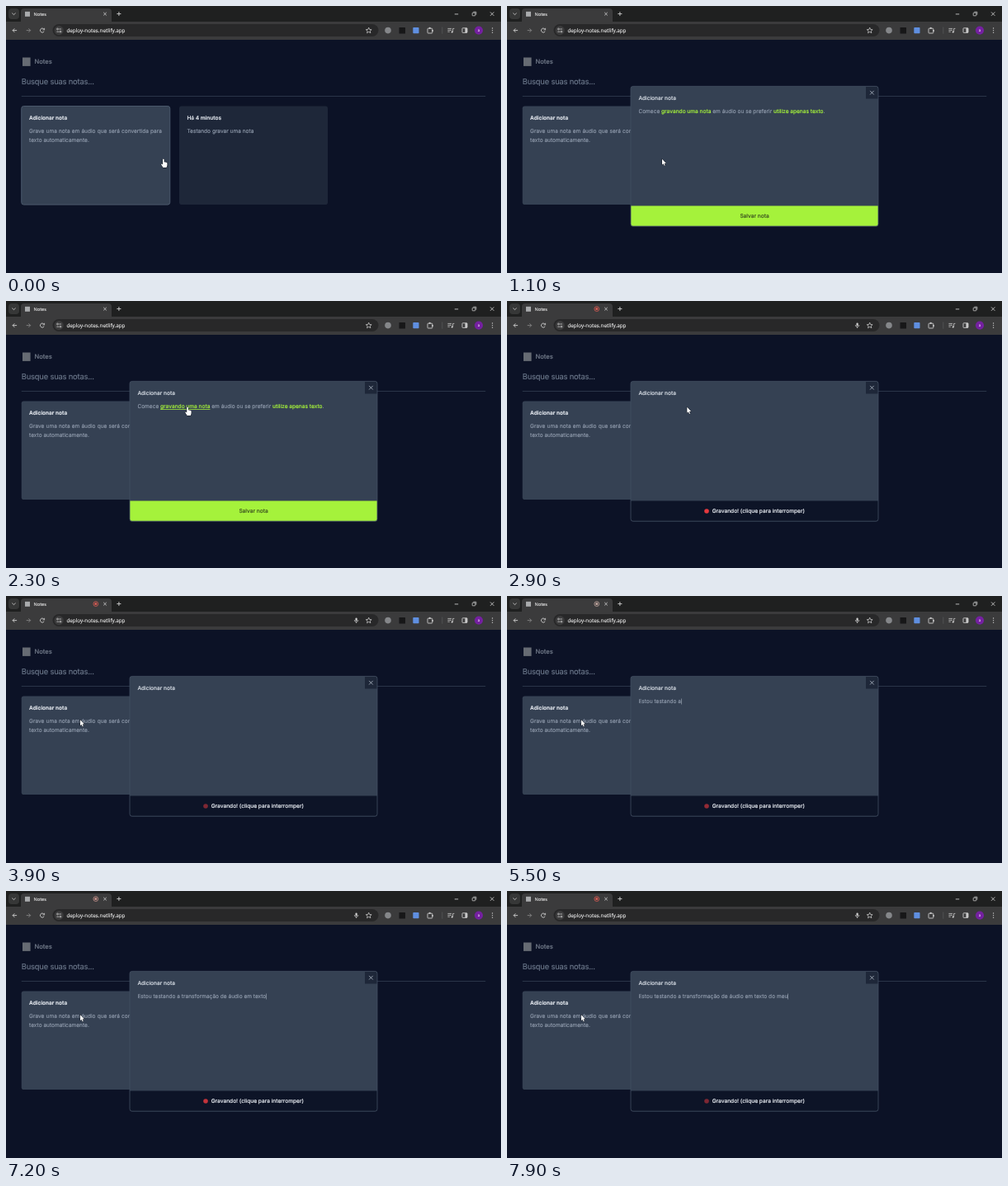
An HTML page with a canvas that plays this animation: 600x324 px, repeating every 8000 ms.

```html
<!DOCTYPE html>
<html lang="pt-BR">
<head>
<meta charset="utf-8">
<title>Notes</title>
<style>
html, body { margin: 0; width: 100%; height: 100%; overflow: hidden; background: #0c1226; }
canvas { display: block; width: 600px; height: 324px; }
</style>
</head>
<body>
<canvas id="stage"></canvas>
<script>
const W = 600, H = 324, LOOP = 8000;
const canvas = document.getElementById('stage');
const ctx = canvas.getContext('2d');
const dpr = window.devicePixelRatio || 1;
canvas.width = W * dpr;
canvas.height = H * dpr;

const UI = 'Inter, sans-serif';
const SYSTEM = '"Open Sans", sans-serif';
const SMALL = 6.5625;
const PAGE = '#0c1226', SLATE = '#354153', LIME = '#a5f23b';
const MUTED = '#919cad', LIGHT = '#eaeef4', ICON = '#c9c9c9';

const OPEN = 400, RECORD = 2800;
const LINK = { x: 187, y: 123, w: 61, h: 10 };

// Time, x and y of the pointer tip.
const PATH = [
  [0, 190.8, 185.5], [400, 190.8, 185.5], [900, 188, 185.7], [1500, 188, 185.7],
  [2100, 206, 155], [2300, 220, 128.5], [2850, 220, 128.5], [3600, 90, 150.3]
];
const WORDS = [
  [4700, 'Estou'], [5100, 'testando'], [5400, 'a'], [5800, 'transformação'], [6200, 'de'],
  [6500, 'áudio'], [6800, 'em'], [7000, 'texto'], [7500, 'do'], [7700, 'meu']
];

const smooth = p => p * p * (3 - 2 * p);

function box(x, y, w, h, r, fill, stroke, lw = 0.8) {
  ctx.beginPath();
  ctx.roundRect(x, y, w, h, r);
  if (fill) { ctx.fillStyle = fill; ctx.fill(); }
  if (stroke) { ctx.strokeStyle = stroke; ctx.lineWidth = lw; ctx.stroke(); }
}

function disc(x, y, r, fill, stroke, lw = 0.8) {
  box(x - r, y - r, 2 * r, 2 * r, r, fill, stroke, lw);
}

function line(points, color, lw = 0.9) {
  ctx.beginPath();
  for (let i = 0; i < points.length; i += 2) ctx.lineTo(points[i], points[i + 1]);
  ctx.strokeStyle = color;
  ctx.lineWidth = lw;
  ctx.stroke();
}

function cross(x, y, r, color, lw) {
  line([x - r, y - r, x + r, y + r], color, lw);
  line([x - r, y + r, x + r, y - r], color, lw);
}

// Draws one run of text, slightly thickened, and returns its right edge.
function text(s, x, y, color, { size = SMALL, weight = 400, font = UI, track = 0, gap = 0, align = 'left' } = {}) {
  ctx.font = `${weight} ${size}px ${font}`;
  ctx.letterSpacing = track + 'px';
  ctx.wordSpacing = gap + 'px';
  ctx.textAlign = align;
  ctx.fillStyle = ctx.strokeStyle = color;
  ctx.lineWidth = 0.14;
  ctx.lineJoin = 'round';
  ctx.fillText(s, x, y);
  ctx.strokeText(s, x, y);
  return x + ctx.measureText(s).width;
}

function drawTabs(t) {
  box(0, 0, W, 20, 0, '#1f2020');
  box(3, 3, 13, 13, 4, '#363737');
  line([7.4, 8.6, 9.5, 10.6, 11.6, 8.6], ICON);
  box(18, 3, 110, 20, 4, '#3b3b3c');
  box(23, 6.8, 6, 6, 0, '#a9abad');
  text('Notes', 33.6, 11.8, '#e4e4e4', { size: 5.55, font: SYSTEM });
  if (t >= RECORD) drawTabRecord(t);
  cross(120, 9.6, 1.8, '#d5d5d5', 0.8);
  line([134.4, 9.5, 139.4, 9.5], '#d0d0d0');
  line([136.9, 7, 136.9, 12], '#d0d0d0');
  line([543.8, 9.9, 548.2, 9.9], '#dddddd', 0.8);
  box(565.2, 8.2, 3.6, 3.6, 0.5, null, '#dddddd', 0.7);
  line([566.4, 7.2, 569.8, 7.2, 569.8, 10.6], '#dddddd', 0.7);
  cross(589.2, 9.6, 2.2, '#dddddd', 0.8);
}

function drawTabRecord(t) {
  const glow = 0.5 + 0.5 * Math.cos((t - 3900) / 1000 * 2 * Math.PI);
  const mix = (a, b) => Math.round(a + (b - a) * glow);
  const color = `rgb(${mix(196, 220)},${mix(178, 92)},${mix(172, 84)})`;
  disc(108.8, 9.6, 2.9, null, color, 0.8);
  disc(108.8, 9.6, 1.5, color);
}

function drawArrow(x, dir, color) {
  line([x - 2.5, 29.6, x + 2.5, 29.6], color);
  line([x + dir * 0.2, 27.3, x + dir * 2.5, 29.6, x + dir * 0.2, 31.9], color);
}

function drawStar(x, y, r) {
  const points = [];
  for (let i = 0; i <= 10; i++) {
    const a = i * Math.PI / 5 - Math.PI / 2, d = i % 2 ? r * 0.45 : r;
    points.push(x + d * Math.cos(a), y + d * Math.sin(a));
  }
  line(points, '#d2d2d2', 0.75);
}

function drawMic(x, y) {
  box(x - 1.1, y - 3.4, 2.2, 4, 1.1, '#d0d0d0');
  ctx.beginPath();
  ctx.arc(x, y - 0.7, 2.3, 0, Math.PI);
  ctx.strokeStyle = '#d0d0d0';
  ctx.lineWidth = 0.7;
  ctx.stroke();
  line([x, y + 1.6, x, y + 3.2], '#d0d0d0', 0.8);
}

function drawToolbar(t) {
  box(0, 19, W, 22, 0, '#3b3b3c');
  box(56.5, 22, 395, 15, 7.5, '#282829');
  drawArrow(10.6, -1, '#d2d2d2');
  drawArrow(27.2, 1, '#858585');
  ctx.beginPath();
  ctx.arc(44, 29.6, 2.5, 0.5, 5.6);
  ctx.strokeStyle = '#d2d2d2';
  ctx.lineWidth = 0.9;
  ctx.stroke();
  line([46.6, 26.8, 46.6, 28.9, 44.5, 28.9], '#d2d2d2', 0.8);

  disc(64.2, 29.6, 5.6, '#3c3c3d');
  disc(62.5, 28, 0.9, null, '#d8d8d8', 0.7);
  line([64.2, 28, 67, 28], '#d8d8d8', 0.7);
  disc(66, 31.2, 0.9, null, '#d8d8d8', 0.7);
  line([61.4, 31.2, 64.3, 31.2], '#d8d8d8', 0.7);
  text('deploy-notes.netlify.app', 73.4, 31.8, '#e8e8e8', { size: 6.35, font: SYSTEM });
  if (t >= RECORD) drawMic(424.6, 29.8);
  drawStar(439.7, 29.8, 3.6);

  disc(463, 29.6, 3.8, '#85878a');
  box(476.5, 26, 7.5, 7.5, 0.5, '#171718');
  box(493.3, 26, 7.2, 7.2, 0.8, '#5f8fe0');
  box(511, 27.2, 5.8, 5.8, 0.7, null, ICON, 0.9);
  disc(513.7, 26.8, 1.1, ICON);
  disc(517, 30, 1, ICON);
  line([528.8, 25.5, 528.8, 33.7], '#5b5c5e', 0.7);
  for (const [dy, end] of [[-2.2, 540], [-0.3, 540], [1.6, 537.8]]) {
    line([535.4, 29.6 + dy, end, 29.6 + dy], ICON, 0.8);
  }
  line([541.6, 31.5, 541.6, 27.4, 543.4, 27.4], ICON, 0.8);
  disc(540.7, 31.6, 1.1, ICON);
  box(553, 26.8, 6, 5.6, 0.6, null, ICON, 0.9);
  box(556.4, 26.8, 2.6, 5.6, 0, ICON);
  disc(573, 29.6, 5.1, '#7420a0');
  text('a', 573, 31.1, '#e9d9f0', { size: 4.6, font: SYSTEM, align: 'center' });
  for (const dy of [-2.6, 0, 2.6]) disc(589.6, 29.6 + dy, 0.65, '#d2d2d2');
}

function drawPage(t) {
  box(0, 41, W, H - 41, 0, PAGE);
  box(20, 62.5, 9.6, 10.4, 0, '#666b73');
  text('Notes', 34.4, 69.8, '#727b8a', { size: 7.6, weight: 500 });
  text('Busque suas notas...', 18.8, 94.6, '#6c788b', { size: 9.375, track: -0.19 });
  box(18.75, 109.1, 562.5, 0.8, 0, '#2a3548');

  box(18.75, 121.5, 180, 119.6, 2.8, SLATE, t < OPEN ? '#4a586b' : null, 1);
  text('Adicionar nota', 28.1, 137.5, LIGHT, { weight: 600 });
  text('Grave uma nota em áudio que será convertida para', 28.1, 153.6, MUTED, { gap: 0.3 });
  text('texto automaticamente.', 28.1, 164.7, MUTED);

  box(210, 121.5, 180, 119.6, 2.8, '#1e2739');
  text('Há 4 minutos', 219.4, 137.5, '#dfe4eb', { weight: 600 });
  text('Testando gravar uma nota', 219.4, 153.6, MUTED);
}

function drawDialog(t, hover) {
  const recording = t >= RECORD;
  ctx.save();
  ctx.beginPath();
  ctx.roundRect(150, 97.4, 300, 169.8, 2.8);
  ctx.clip();
  box(150, 97, 300, 171, 0, SLATE);
  box(150, 242.6, 300, 25, 0, recording ? '#0d1427' : LIME);
  box(435, 97, 15, 15.4, 0, '#1e2739');
  ctx.restore();
  box(150, 97.4, 300, 169.8, 2.8, null, '#435063', 0.8);
  cross(442.4, 105.2, 2.3, '#b3bcc8', 0.8);
  text('Adicionar nota', 159.4, 114.2, '#d8dee6', { weight: 500 });

  if (recording) {
    drawSpeech(t);
    drawRecordBar(t);
  } else {
    drawPrompt(hover);
    text('Salvar nota', 300, 257.4, '#3c5220', { weight: 500, align: 'center' });
  }
}

function drawPrompt(hover) {
  const y = 130.3;
  const link = { weight: 500 };
  const start = text('Comece ', 159.4, y, MUTED);
  let x = text('gravando uma nota', start, y, LIME, link);
  if (hover) box(start, y + 0.8, x - start, 0.6, 0, LIME);
  x = text(' em áudio ou se preferir ', x, y, MUTED);
  x = text('utilize apenas texto', x, y, LIME, link);
  text('.', x, y, MUTED);
}

function drawSpeech(t) {
  const said = WORDS.filter(([at]) => t >= at);
  if (!said.length) return;
  const end = text(said.map(w => w[1]).join(' '), 159.4, 130.3, MUTED);
  const since = t - said[said.length - 1][0];
  if (since % 1000 < 500) box(end, 124.4, 0.6, 7.2, 0, '#a2acba');
}

function drawRecordBar(t) {
  const phase = (t - RECORD) % 2000 / 1000;
  const fade = smooth(phase < 1 ? phase : 2 - phase);
  ctx.globalAlpha = 1 - 0.5 * fade;
  disc(242, 255, 2.8, '#ea3a3f');
  ctx.globalAlpha = 1;
  text('Gravando! (clique para interromper)', 248.7, 257.4, LIGHT, { weight: 500 });
}

function pointerAt(t) {
  let i = PATH.length - 1;
  while (i > 0 && PATH[i][0] > t) i--;
  const a = PATH[i], b = PATH[i + 1] || a;
  const p = a === b ? 0 : smooth((t - a[0]) / (b[0] - a[0]));
  return { x: a[1] + (b[1] - a[1]) * p, y: a[2] + (b[2] - a[2]) * p };
}

function drawPointer({ x, y }, hand) {
  ctx.save();
  ctx.translate(x, y);
  const shape = hand
    ? 'M-.8 .6Q0-.5 .8 .6V4Q1.8 3.3 2.3 4.2Q3.2 3.7 3.6 4.6Q4.6 4.4 4.6 5.6V7.4Q4.5 9 3.6 10.6H-.4L-2.8 6.8Q-2.6 5.6-1.6 6.2L-.8 7Z'
    : 'M0 0V7L1.6 5.6L2.7 8.1L3.8 7.6L2.7 5.2H4.9Z';
  const path = new Path2D(shape);
  ctx.lineJoin = 'round';
  ctx.strokeStyle = '#11151c';
  ctx.lineWidth = 0.9;
  ctx.stroke(path);
  ctx.fillStyle = '#ffffff';
  ctx.fill(path);
  ctx.restore();
}

function render(t) {
  ctx.setTransform(dpr, 0, 0, dpr, 0, 0);
  ctx.textRendering = 'geometricPrecision';
  const tip = pointerAt(t);
  const overLink = t >= OPEN && t < RECORD &&
    tip.x >= LINK.x && tip.x <= LINK.x + LINK.w && tip.y >= LINK.y && tip.y <= LINK.y + LINK.h;
  drawPage(t);
  drawTabs(t);
  drawToolbar(t);
  if (t >= OPEN) drawDialog(t, overLink);
  drawPointer(tip, t < OPEN || overLink);
}

function tick() {
  render(performance.now() % LOOP);
  requestAnimationFrame(tick);
}
tick();
</script>
</body>
</html>
```
